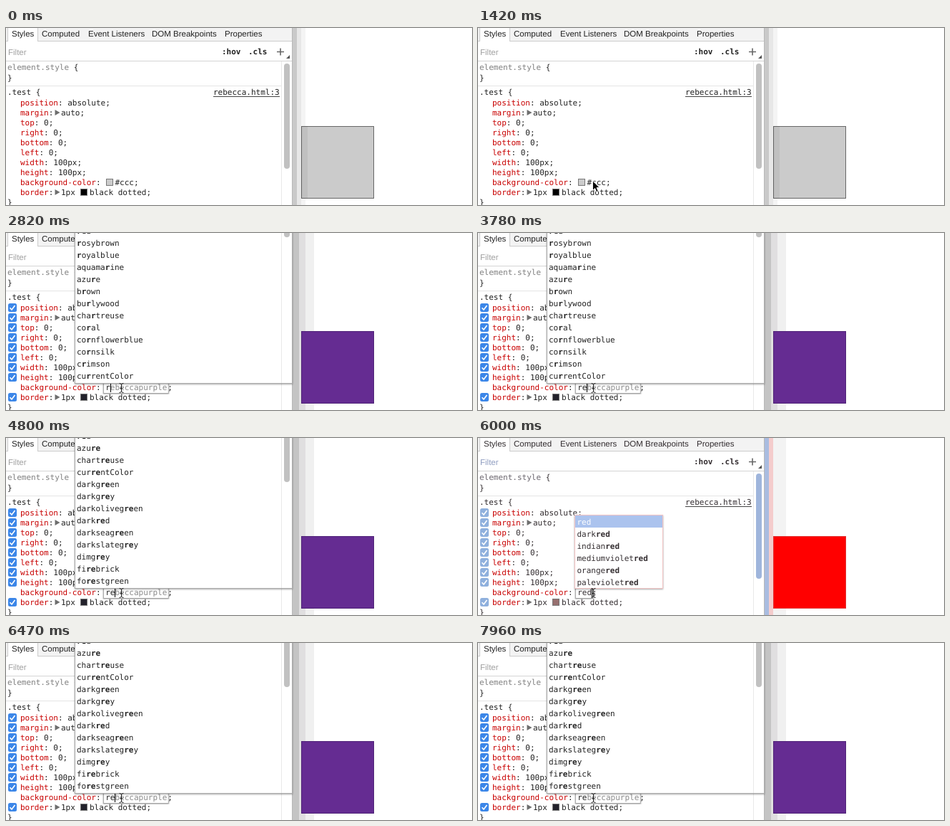
These frames come from a looping animation (652x249 px, 8000 ms). An HTML page:

```html
<!DOCTYPE html>
<html lang="en">
<head>
<meta charset="utf-8">
<title>Style panel autocomplete</title>
<style>
  html, body { margin: 0; width: 100%; height: 100%; overflow: hidden; background: #fff; }
  svg {
    display: block; width: 652px; height: 249px;
    --box: #cbcbcb; --dots: #000; --black: #000; --ink: #222; --dim: #808080; --hint: #a0a0a0;
    --thumb: #c1c1c1; --check: #3b86e8; --edge: #aaa; --a: #c9c9c9; --b: #e7e7e7; --c: #f4f4f4;
  }
  svg[data-theme=purple] {
    --box: #652c92; --dots: #39195a; --black: #23222b; --a: #c4c4c4; --b: #e0dfe0; --c: #f0f0f0;
  }
  svg[data-theme=red] {
    --box: #f00; --dots: #c06060; --black: #97706f; --ink: #332d30; --dim: #6d6870; --hint: #8f9dc0;
    --thumb: #9fb5dc; --check: #8fb0dd; --edge: #f3c3c3; --a: #a9bce0; --b: #f4cccc; --c: #f3f3f3;
  }
  text { white-space: pre; text-rendering: geometricPrecision; fill: var(--ink); }
  .mono { font: 11px "DejaVu Sans Mono", Menlo, monospace; }
  .sans { font: 11.5px "Liberation Sans", Arial, sans-serif; }
  .prop { fill: #c80000; }
  .dim { fill: var(--dim); }
  .hint { fill: var(--hint); }
  .ghost { fill: #8a8a8a; }
  .light { fill: #fff; }
  .bold { font-weight: bold; }
  .thumb { fill: var(--thumb); }
</style>
</head>
<body>
<svg id="stage" viewBox="0 0 652 249" data-theme="gray">
  <defs>
    <filter id="soft" x="-10%" y="-10%" width="120%" height="120%">
      <feDropShadow dx="0" dy="1" stdDeviation="1" flood-opacity=".35"/>
    </filter>
  </defs>
  <rect width="652" height="249" fill="#fff"/>
  <g id="shade">
    <rect height="249" fill="var(--c)"/>
    <rect height="249" fill="var(--b)"/>
    <rect height="249" fill="var(--a)"/>
  </g>
  <rect x="413" y="138" width="102" height="102" fill="var(--box)"/>
  <rect id="boxShade" x="413" y="138" width="9" height="102" fill="#c0c0c0"/>
  <rect x="413.5" y="138.5" width="101" height="101" fill="none" stroke="var(--dots)" stroke-dasharray="1 1"/>

  <rect width="401" height="249" fill="#fff"/>
  <rect width="401" height="19" fill="#f3f3f3"/>
  <path d="M0 18.5H401" stroke="#ccc"/>
  <path d="M2.5 0V18.5M44.5 0V18.5" stroke="#ccc"/>
  <rect x="3" width="41" height="19" fill="#fff"/>
  <path d="M0 46.5H400" stroke="#d4d4d4"/>
  <path d="M0 81.5H385" stroke="#e4e4e4"/>
  <path d="M385.5 47V249" stroke="#e8e8e8"/>
  <path d="M400.5 0V249" stroke="#b8b8b8"/>
  <rect class="thumb" x="389" y="50" width="8" height="148" rx="4"/>
  <path d="M379 33.5H389M384 28.5V38.5" stroke="#666" stroke-width="1.6"/>
  <path d="M397 38V43H392Z" fill="#555"/>
  <g id="panel"></g>
  <g id="checks"></g>
  <g id="plain"></g>
  <g id="editor"></g>
  <rect id="caret" y="211" width="1" height="13" fill="#000"/>
  <g id="popup"></g>
  <path id="arrow" d="M0 0V13.4L3.1 10.5L5.3 15.6L7.7 14.6L5.5 9.6H9.6Z" fill="#000" stroke="#fff" stroke-width=".9"/>
  <path id="beam" d="M158.5 211.5Q161.5 211.5 161.5 213.5Q161.5 211.5 164.5 211.5M161.5 213V223M159.5 218.5H163.5M158.5 224.5Q161.5 224.5 161.5 222.5Q161.5 224.5 164.5 224.5" fill="none" stroke="#222"/>
</svg>
<script>
const $ = id => document.getElementById(id);
const CHAR = 11 * 0.602, LOOP = 8000, EDIT_X = 20 + 18 * CHAR, EDIT_Y = 221;

const text = (x, y, s, cls = '') => `<text class="mono ${cls}" x="${x}" y="${y}">${s}</text>`;
const label = (x, y, s, cls = '') => `<text class="sans ${cls}" x="${x}" y="${y}">${s}</text>`;
const rect = (x, y, w, h, attrs) => `<rect x="${x}" y="${y}" width="${w}" height="${h}" ${attrs}/>`;
const swatch = (x, y, fill) => rect(x + .5, y - 8.5, 9, 9, `fill="${fill}" stroke="#777"`);

const rules = [
  ['position', 'absolute'], ['margin', 'auto', true], ['top', '0'], ['right', '0'],
  ['bottom', '0'], ['left', '0'], ['width', '100px'], ['height', '100px'],
  ['background-color'], ['border', '1px', true]
];
const ruleY = i => 109 + 14 * i;

function drawRule([name, value, expands], i) {
  const y = ruleY(i), end = 20 + (name.length + 1) * CHAR;
  let out = text(20, y, name, 'prop') + text(end - CHAR, y, ':');
  if (expands) out += `<path d="M68.5 ${y - 8}L75.5 ${y - 4}L68.5 ${y}Z" fill="#6e6e6e"/>`;
  if (name === 'border')
    out += text(77, y, value) + swatch(104, y, 'var(--black)') + text(117, y, 'black dotted;');
  else if (value) out += text(expands ? 77 : end + CHAR, y, value + ';');
  return out;
}

function drawCheck(i) {
  const y = ruleY(i) - 10;
  return rect(3, y, 12, 12, 'rx="2.5" fill="var(--check)"') +
    `<path d="M5.5 ${y + 6.2}L8 ${y + 9}L12.5 ${y + 3}" fill="none" stroke="#fff" stroke-width="1.6"/>`;
}

$('panel').innerHTML =
  label(8, 12, 'Styles') + label(50, 12, 'Computed') + label(115, 12, 'Event Listeners') +
  label(204, 12, 'DOM Breakpoints') + label(306, 12, 'Properties') +
  label(3, 38, 'Filter', 'hint') + text(302, 37, ':hov', 'bold') + text(339, 37, '.cls', 'bold') +
  text(2, 59, 'element.style', 'dim') + text(2 + 14 * CHAR, 59, '{') + text(2, 74, '}') +
  text(2, 94, '.test {') + text(290, 94, 'rebecca.html:3') +
  '<path d="M290 96.5H383" stroke="#444"/>' +
  rules.map(drawRule).join('') + text(2, 249, '}');
$('plain').innerHTML = swatch(140, EDIT_Y, '#ccc') + text(152.5, EDIT_Y, '#ccc;');

const lists = {
  r: 'red rosybrown royalblue aquamarine azure brown burlywood chartreuse coral cornflowerblue cornsilk crimson currentColor',
  re: 'red azure chartreuse currentColor darkgreen darkgrey darkolivegreen darkred darkseagreen darkslategrey dimgrey firebrick forestgreen',
  red: 'red darkred indianred mediumvioletred orangered palevioletred'
};

function drawPopup(match) {
  if (!match) return '';
  const short = match === 'red';
  const [x, y, w, h] = short ? [135.5, 108.5, 123, 103] : [96.5, -8.5, 304, 220];
  let out = rect(x, y, w, h, 'fill="#fff" stroke="var(--edge)" filter="url(#soft)"');
  if (short) out += rect(136, 109, 122, 17, 'fill="#abc3ee"');
  else out += '<path d="M385.5 0V211" stroke="#e8e8e8"/>' +
    rect(389, -20, 8, match === 'r' ? 26 : 82, 'class="thumb" rx="4"');
  lists[match].split(' ').forEach((word, i) => {
    const picked = short && i === 0;
    const shown = picked ? word : word.replace(match, `<tspan class="bold">${match}</tspan>`);
    out += text(short ? 138.5 : 99, (short ? 121.5 : 1) + 17 * i, shown, picked ? 'light' : '');
  });
  return out;
}

function drawEditor(typed, ghost) {
  if (!typed) return '';
  const end = EDIT_X + (typed + ghost).length * CHAR;
  return rect(136.5, 210.5, end - 134.5, 15, 'fill="#fff" stroke="#aaa" filter="url(#soft)"') +
    (typed === '#ccc' ? rect(EDIT_X, 211, 4 * CHAR, 14, 'fill="#b3d4fd"') : '') +
    text(EDIT_X, EDIT_Y, typed) + text(EDIT_X + typed.length * CHAR, EDIT_Y, ghost, 'ghost') +
    text(end + 1, EDIT_Y, ';');
}

// time, theme, typed text, completion, popup match, caret
const timeline = [
  [0, 'gray', '', '', '', 0],
  [1800, 'gray', '#ccc', '', '', 0],
  [2820, 'purple', 'r', 'ebeccapurple', 'r', 1],
  [3360, 'purple', 'r', 'ebeccapurple', 'r', 0],
  [3780, 'purple', 're', 'beccapurple', 'r', 1],
  [3840, 'purple', 're', 'beccapurple', 're', 1],
  [4320, 'purple', 're', 'beccapurple', 're', 0],
  [4800, 'purple', 're', 'beccapurple', 're', 1],
  [4980, 'red', 'red', '', 'red', 1],
  [5460, 'red', 'red', '', 'red', 0],
  [6000, 'red', 'red', '', 'red', 1],
  [6410, 'red', 're', '', 'red', 1],
  [6470, 'purple', 're', 'beccapurple', 're', 1],
  [6940, 'purple', 're', 'beccapurple', 're', 0],
  [7480, 'purple', 're', 'beccapurple', 're', 1],
  [7960, 'purple', 're', 'beccapurple', 're', 0]
];
const shadeEnds = { gray: [419, 413, 407], purple: [431, 419, 410], red: [431, 413, 407] };
const show = (id, on) => { $(id).style.display = on ? '' : 'none'; };
let current;

function applyState(state) {
  const [, theme, typed, ghost, match, caret] = state;
  $('stage').dataset.theme = theme;
  [...$('shade').children].forEach((band, i) => {
    band.setAttribute('x', 401);
    band.setAttribute('width', shadeEnds[theme][i] - 401);
  });
  $('editor').innerHTML = drawEditor(typed, ghost);
  $('popup').innerHTML = drawPopup(match);
  $('caret').setAttribute('x', Math.round(EDIT_X + typed.length * CHAR));
  show('caret', caret);
  show('plain', !typed);
  show('boxShade', theme === 'gray');
  $('checks').innerHTML = rules.map((rule, i) => typed && i === 8 ? '' : drawCheck(i)).join('');
}

function render() {
  const t = performance.now() % LOOP;
  const state = timeline.findLast(s => s[0] <= t);
  if (state !== current) applyState(current = state);
  show('checks', t >= 1740);
  show('arrow', t >= 950 && t < 1740);
  show('beam', t >= 1740);
  const step = Math.min(8, Math.max(0, Math.floor((t - 950) / 58.75))) / 8;
  const left = (1 - step) ** 2;
  $('arrow').setAttribute('transform', `translate(${160.5 - 5 * left} ${215 + 31 * left})`);
  requestAnimationFrame(render);
}
render();
</script>
</body>
</html>
```
